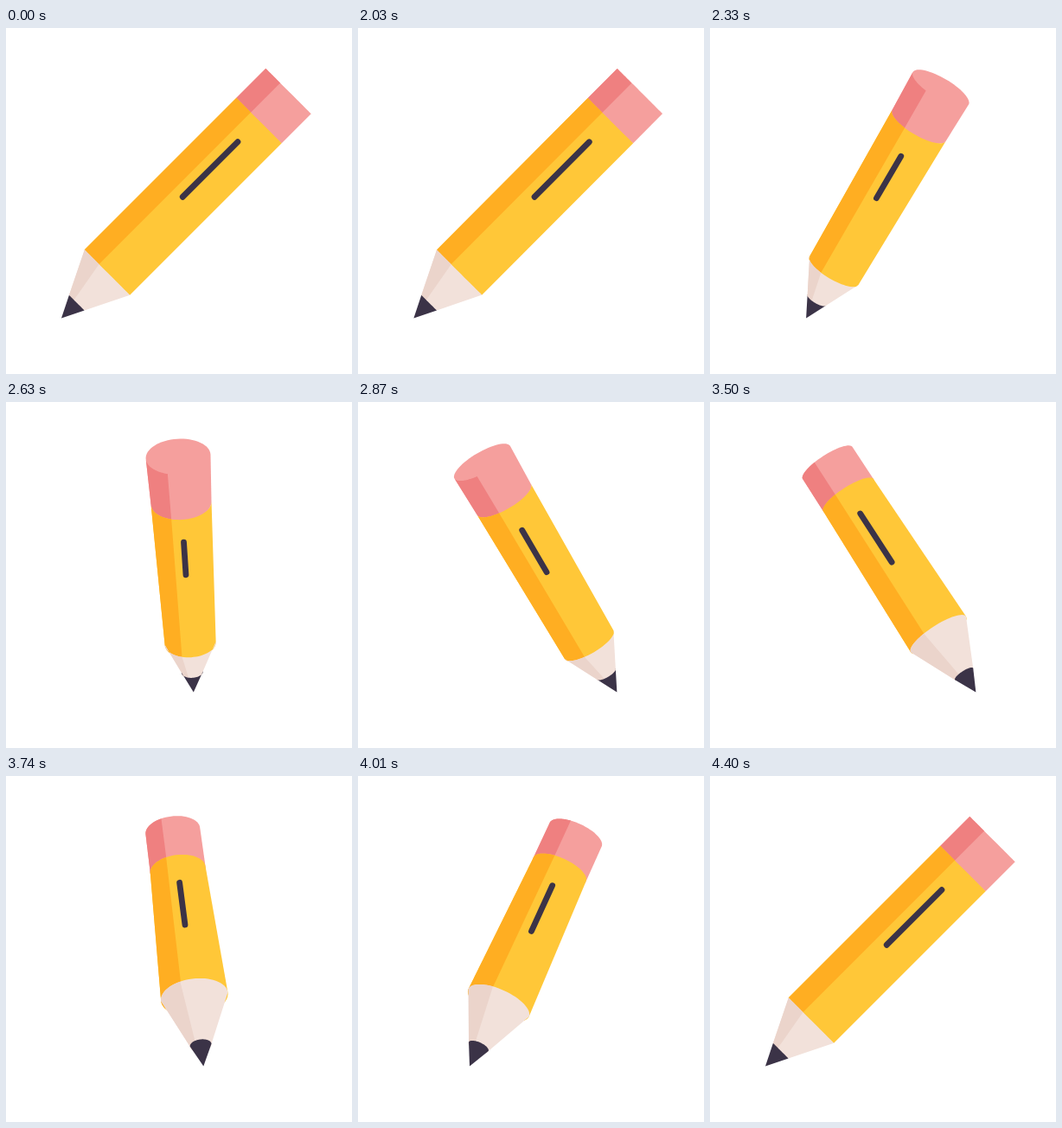
Animation, 400 px wide and 400 px high, one loop 4430 ms. Source, as an HTML page with a canvas:

```html
<!DOCTYPE html>
<html lang="en">
<head>
<meta charset="utf-8">
<title>Turning pencil</title>
<style>
  html, body { margin: 0; width: 100%; height: 100%; overflow: hidden; background: #fff; }
  canvas { display: block; width: 400px; height: 400px; }
</style>
</head>
<body>
<canvas id="stage" width="400" height="400"></canvas>
<script>
const ctx = document.getElementById('stage').getContext('2d');

const LOOP = 4430, REST = 2000, STEP = 30, TURN = 2400;
const AXIS_X = 205.25, SWING = 141.25, TIP_Y = 335.5;
const LEFT = Math.PI, RIGHT = 0, FACET = Math.acos(-0.36);

const INK = '#3b3347';
const COLORS = [
  ['#f59f9d', '#ef8080'],
  ['#ffc738', '#ffae22'],
  ['#f2e1da', '#ebd4cb'],
  [INK, INK],
];

// Pose of the pencil: cross-section rings from the eraser down to the point.
function pose(angle) {
  const sin = Math.sin(angle), cos = Math.cos(angle), depth = sin * sin;
  const mix = (side, front, back) => side + ((sin > 0 ? front : back) - side) * depth;
  const slope = cos * (1 - 0.17 * depth);
  const tipX = AXIS_X - SWING * cos * (1 + 0.045 * depth);
  const tilt = 0.55 * depth * Math.sign(sin);
  const ring = (y, r) => ({ x: tipX + slope * (TIP_Y - y), y, r, bulge: r * tilt });
  return {
    turn: Math.atan(slope),
    rings: [
      ring(73 - 10 * depth * depth, mix(37, 37.5, 31.5)),
      ring(mix(107, 117, 108.5), mix(37, 35, 32)),
      ring(mix(282.5, 279, 254.5), mix(37, 29.5, 39)),
      ring(mix(317.7, 312, 311), 12.5),
      ring(TIP_Y, 0),
    ],
    mark: [mix(0.14, 0.164, 0.225), mix(0.503, 0.4, 0.565)],
  };
}

function draw(angle) {
  const { turn, rings, mark } = pose(angle);
  const c = Math.cos(turn), s = Math.sin(turn);

  const point = (ring, phi, bulge) => {
    const u = ring.r * Math.cos(phi), v = bulge * Math.sin(phi);
    return [ring.x + u * c - v * s, ring.y + u * s + v * c];
  };
  const arc = (ring, from, to, bulge) =>
    Array.from({ length: 33 }, (_, i) => point(ring, from + (to - from) * i / 32, bulge));

  // Each part runs slightly under the next one, which is painted over it.
  const part = (i, to, topBulge, color) => {
    const next = rings[i + 1];
    ctx.beginPath();
    arc(rings[i], LEFT, to, topBulge).forEach(p => ctx.lineTo(...p));
    arc(next, to, LEFT, next.r && Math.abs(next.bulge) + 1).forEach(p => ctx.lineTo(...p));
    ctx.fillStyle = color;
    ctx.fill();
  };

  ctx.clearRect(0, 0, 400, 400);
  COLORS.forEach(([light, dark], i) => {
    const { bulge } = rings[i];
    part(i, RIGHT, i ? bulge : -Math.abs(bulge), light);
    if (dark !== light) part(i, FACET, bulge, dark);
  });

  const [x0, y0] = point(rings[1], Math.PI / 2, rings[1].bulge);
  const [x1, y1] = point(rings[2], Math.PI / 2, rings[2].bulge);
  ctx.beginPath();
  mark.forEach(f => ctx.lineTo(x0 + (x1 - x0) * f, y0 + (y1 - y0) * f));
  ctx.lineWidth = 6.8;
  ctx.lineCap = 'round';
  ctx.strokeStyle = INK;
  ctx.stroke();
}

function frame() {
  const time = performance.now() % LOOP - REST;
  const stepped = Math.floor(time / STEP) * STEP;
  draw(Math.min(Math.max(stepped / TURN, 0), 1) * 2 * Math.PI);
  requestAnimationFrame(frame);
}
frame();
</script>
</body>
</html>
```
